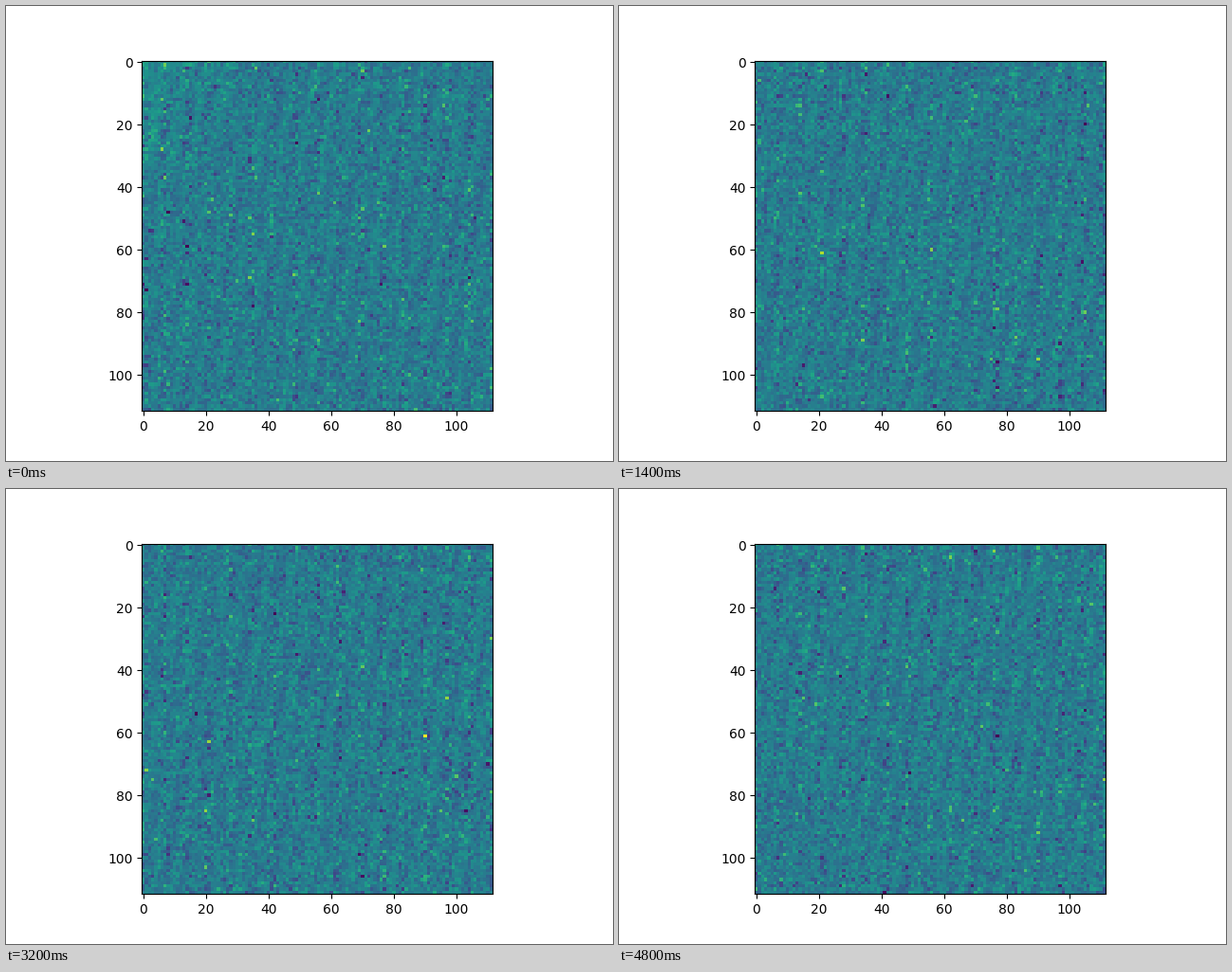
A matplotlib script that plays this animation: 640 by 480 pixels, repeating every 4900 ms.

```python
import numpy as np
import matplotlib.pyplot as plt
from matplotlib.animation import FuncAnimation

N = 112
FRAMES = 49
INTERVAL = 100
BANDS = 16

rows, cols = np.mgrid[:N, :N]
phase = BANDS * cols / (N - 1)

# Noise is strongest along evenly spaced columns; faint streaks lean right.
band = (0.5 + 0.5 * np.cos(2 * np.pi * phase)) ** 3
spread = 0.056 + 0.036 * band
streaks = 0.026 * np.cos(2 * np.pi * (phase + rows / 42))
corner = 0.11 * np.exp(-(cols + 0.7 * rows) / 16)


def field(step):
    """Heavy-tailed noise plus a corner glow that dies out at once."""
    rng = np.random.default_rng(700 + step)
    noise = spread * rng.standard_t(9, (N, N))
    return 0.415 + streaks + noise + corner * np.exp(-3 * step)


fig, ax = plt.subplots(figsize=(6.4, 4.8), dpi=100)
image = ax.imshow(field(0), cmap="viridis", vmin=0, vmax=1)


def update(step):
    image.set_data(field(step))
    return (image,)


anim = FuncAnimation(fig, update, frames=FRAMES, interval=INTERVAL,
                     repeat=True, repeat_delay=0)
plt.show()
```
